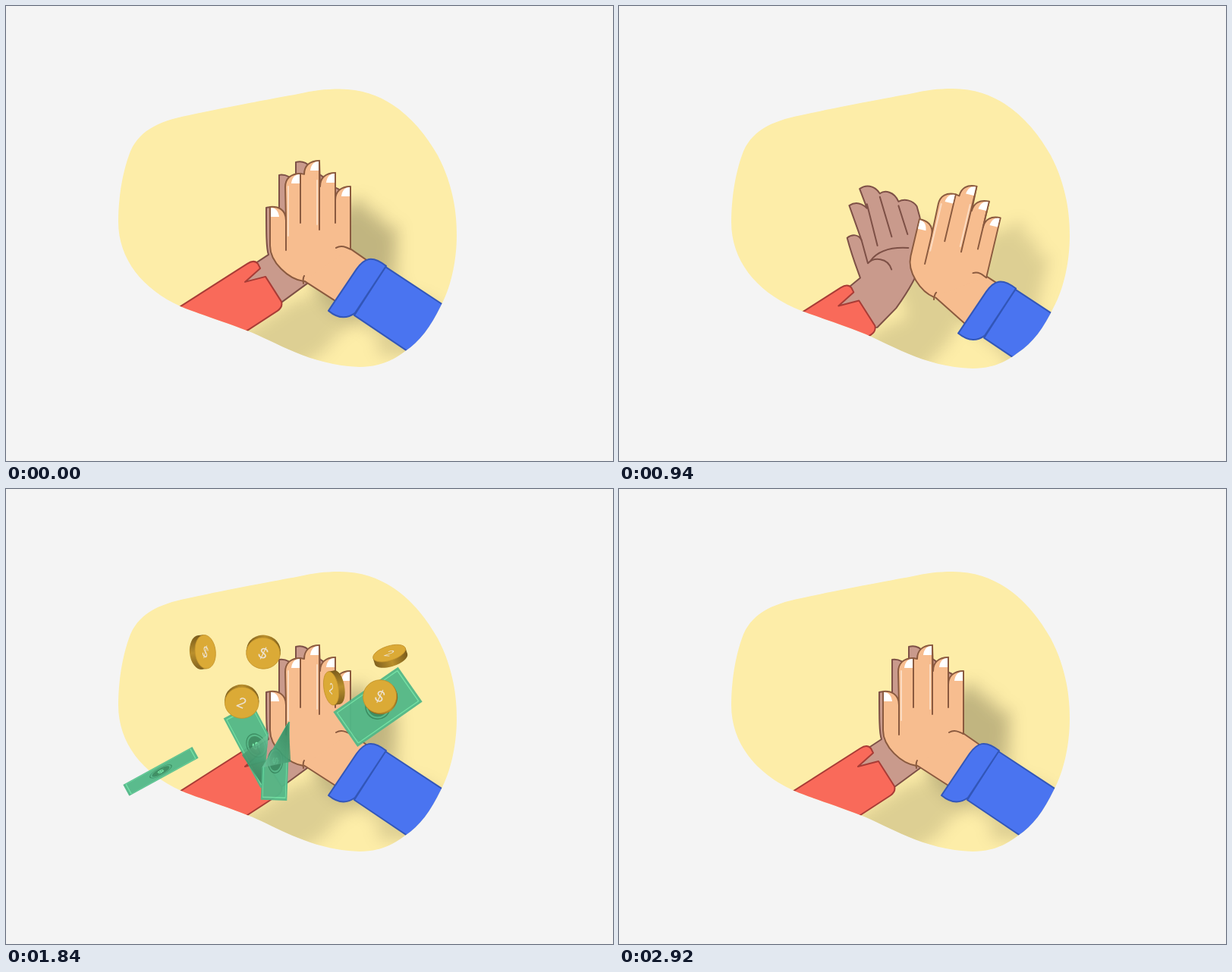
Animation of 800x600 px, one loop 2.94 s. Source, as an HTML page:

```html
<!DOCTYPE html>
<html lang="en">
<head>
<meta charset="utf-8">
<title>High five</title>
<style>
html, body { margin: 0; width: 100%; height: 100%; overflow: hidden; background: #f4f4f4; }
svg { display: block; width: 100%; height: 100%; }
text { font-family: Inter, "Liberation Sans", sans-serif; text-anchor: middle; dominant-baseline: central; }
path { stroke-linejoin: round; stroke-linecap: round; }
</style>
</head>
<body>
<svg viewBox="0 0 800 600">
  <defs>
    <clipPath id="clip"><path class="blob"/></clipPath>
    <filter id="cast" filterUnits="userSpaceOnUse" x="0" y="-50" width="800" height="800" color-interpolation-filters="sRGB">
      <feDropShadow dx="63" dy="50" stdDeviation="10" flood-color="#000" flood-opacity=".125"/>
    </filter>
    <linearGradient id="rim" x1="0" y1="0" x2="0" y2="1">
      <stop offset="0" stop-color="#7a5c1c"/><stop offset=".5" stop-color="#b98f2c"/><stop offset="1" stop-color="#80611f"/>
    </linearGradient>
    <linearGradient id="curl" x1="0" y1="0" x2="1" y2="1">
      <stop offset="0" stop-color="#6cc79c"/><stop offset=".5" stop-color="#3f9c71"/><stop offset="1" stop-color="#2c7d58"/>
    </linearGradient>
  </defs>
  <rect width="800" height="600" fill="#f4f4f4"/>
  <path class="blob" fill="#fdeda8"/>
  <g clip-path="url(#clip)">
    <g id="left" filter="url(#cast)"></g>
    <g id="right" filter="url(#cast)"></g>
  </g>
  <g id="money"></g>
</svg>
<script>
const LOOP = 2940, BURST = 980, APEX = 1160, LAND = 2200;
const HANDS = { x: 405, y: 215 };
const $ = id => document.getElementById(id);
const lerp = (a, b, p) => a + (b - a) * p;

function el(tag, attrs, parent) {
  const node = document.createElementNS('http://www.w3.org/2000/svg', tag);
  set(node, attrs);
  return parent.appendChild(node);
}
function set(node, attrs) {
  for (const key in attrs) node.setAttribute(key, attrs[key]);
}

// Smooth curve through (time, value) keys that never overshoots them.
function curve(t, ts, vs) {
  const last = ts.length - 1;
  if (t <= ts[0]) return vs[0];
  if (t >= ts[last]) return vs[last];
  const slope = i => (vs[i + 1] - vs[i]) / (ts[i + 1] - ts[i]);
  const tangent = i => {
    if (i === 0) return slope(0);
    if (i === last) return slope(last - 1);
    const a = slope(i - 1), b = slope(i);
    return a * b > 0 ? 2 * a * b / (a + b) : 0;
  };
  let i = 0;
  while (t > ts[i + 1]) i++;
  const h = ts[i + 1] - ts[i], u = (t - ts[i]) / h, w = 1 - u;
  return vs[i] * w * w * (1 + 2 * u) + vs[i + 1] * u * u * (3 - 2 * u)
    + h * u * w * (tangent(i) * w - tangent(i + 1) * u);
}

// Blends two paths that share the same commands.
const NUMBER = /-?[\d.]+/g;
function mix(a, b, p) {
  const goal = b.match(NUMBER);
  let i = 0;
  return a.replace(NUMBER, v => lerp(+v, +goal[i++], p).toFixed(2));
}

const blobs = document.querySelectorAll('.blob');
blobs.forEach(b => set(b, { d:
  'M440 109C505 109 545 155 569 197C590 237 594 275 594 303C594 340 585 375 573 397' +
  'C560 424 545 445 526 457C508 471 490 478 466 478C400 476 355 444 318 430' +
  'C285 417 255 408 231 398C180 375 148 335 148 285C148 255 153 222 162 197' +
  'C173 165 200 152 240 144C300 131 350 122 385 115.5C405 111 420 109 440 109Z' }));

const brown = '#7d5046', tan = '#8a5a3f';
const left = $('left'), right = $('right');
const line = stroke => ({ fill: 'none', stroke, 'stroke-width': 2 });
const skin = (fill, stroke) => ({ fill, stroke, 'stroke-width': 2 });

// Parts that change shape between the clapped and the open pose.
const parts = [];
function part(parent, style, closed, open) {
  parts.push({ node: el('path', style, parent), closed, open });
}

part(left, skin('#c99a8c', brown),
  'M308 355L346 330C343 322 343 300 343 268C350 266 358 268 360 280L360 225C366 224 374 226 382 235' +
  'L382 208C390 206 400 208 404 222C410 222 420 224 424 240C430 240 440 242 445 250' +
  'C448 280 440 310 425 330C415 345 405 362 397 368L363 393L320 388Z',
  'M255 424L285 392C278 372 264 362 251 350C257 341 266 340 272 342L237 308C245 299 254 298 262 304' +
  'L241 280C248 270 262 268 273 277C280 267 295 268 303 279C312 270 325 272 331 281' +
  'C345 303 362 325 365 350C366 375 348 400 328 434L314 460L270 470Z');
part(left, line(brown),
  'M382 225L382 300M404 230L404 290M424 250L424 290M370 330C380 320 400 320 420 325M360 280L362 320C370 315 385 315 390 330',
  'M262 304L292 335M273 277L307 321M303 279L329 314M286 343C298 323 314 315 336 312M272 342L288 362C295 350 318 350 323 368');
const redSleeve = el('path', { ...skin('#f96a5a', '#a83c36'),
  d: 'M80 494L318 342Q327 336 332 342L335 348L315 366L342 359L363 392Q365 399 358 404L180 520Z' }, left);

part(right, skin('#f7bd8f', tan),
  'M392 364L434 391L500 380L475 337L452 321', 'M444 406L480 450L540 440L530 402L511 391');

// The right hand: four fingers by one rule, and a mirrored thumb.
const palm = el('g', {}, right);
const fingers = [[388, 223, 65], [413, 206, 91], [434, 222, 66], [454, 240, 82]];
const thumb = { x: 348, y: 267 };
const tip = ([x, y]) => `L${x - 20} ${y + 18}C${x - 20} ${y + 7} ${x - 13} ${y} ${x} ${y}`;
const nail = (x, y, side) => `M${x - side} ${y + 1}v12h${-11 * side}c${side} -8 ${5 * side} -12 ${11 * side} -12z`;
el('path', { ...skin('#f7bd8f', tan),
  d: `M392 365C372 362 348 340 348 318V267C358 266 369 270 369 285${fingers.map(tip).join('')}V322` }, palm);
el('path', { ...line(tan),
  d: 'M369 285V324M435 321C442 317 448 320 454 323M392 368Q391 361 393 358' +
    fingers.slice(0, 3).map(([x, y, depth]) => `M${x} ${y}v${depth}`).join('') }, palm);
el('path', { ...line('#fff1e4'), opacity: .6, d: 'M372 240V305M410 232V290' }, palm);
el('path', { fill: '#fff',
  d: nail(thumb.x, thumb.y, -1) + fingers.map(([x, y]) => nail(x, y, 1)).join('') }, palm);

const blueSleeve = el('g', skin('#4a74f0', '#3256b8'), right);
el('path', { d: 'M500 346L720 491L640 532L459 410Z' }, blueSleeve);
el('path', { d: 'M425 404L462 349C472 335 482 330 501 345L460 407C449 415 437 414 425 404Z' }, blueSleeve);

// Money bursts out of the hands, then falls.
const money = $('money');
const LONG = 52, SHORT = 28;

// Each note flutters through four points [x, y, angle]; `flat` is when it lies flat, `sway` how far it rocks.
const bills = [
  { flat: .65, sway: .12, path: [[450, 172, 13], [482, 177, 79], [490, 287, 145], [495, 405, 210]] },
  { flat: 0, sway: .35, path: [[288, 169, 17], [210, 180, 25], [204, 372, 151], [180, 480, 212]] },
  { flat: .4, sway: .35, path: [[390, 188, -35], [346, 196, 40], [330, 338, 62], [327, 450, 122]] },
  { flat: 1, sway: .35, path: [[430, 192, 118], [400, 220, 192], [355, 358, 272], [357, 534, 315]] }
];
for (const b of bills) {
  const [x, y, angle] = b.path[3];
  b.path.push([x + 20, y + 275, angle + 60]);
  b.node = el('g', { opacity: .95 }, money);
  b.sheet = el('path', { fill: '#52b888' }, b.node);
  b.frame = el('path', { fill: 'none', stroke: '#6fe3a6', 'stroke-width': 1.5, transform: 'scale(.93 .87)' }, b.node);
  el('circle', { r: 16, fill: 'none', stroke: '#338a60', 'stroke-width': 1.5 }, b.node);
  el('circle', { r: 13, fill: '#378c62' }, b.node);
  el('text', { 'font-size': 16, 'font-weight': 700, fill: '#74eeae' }, b.node).textContent = '$';
  b.flap = el('path', { fill: 'url(#curl)', opacity: .85 }, b.node);
}

// Each coin goes from one point to another; `lean` is how far its face turns while it wobbles.
const coins = [
  { from: [293, 92], to: [207, 470], lean: 53, tilt: [20, -20], glyph: '$' },
  { from: [377, 95], to: [281, 463], lean: -23, tilt: [100, 95], glyph: '$' },
  { from: [465, 87], to: [570, 497], lean: 65, tilt: [96, 60], glyph: '2' },
  { from: [418, 131], to: [455, 534], lean: -65, tilt: [15, -22], glyph: '2' },
  { from: [321, 158], to: [295, 533], lean: -23, tilt: [85, 95], glyph: '2' },
  { from: [476, 153], to: [520, 526], lean: -14, tilt: [40, 60], glyph: '$' }
];
for (const c of coins) {
  c.node = el('g', {}, money);
  c.back = el('ellipse', { ry: 22.5, fill: 'url(#rim)' }, c.node);
  c.side = el('rect', { y: -22.5, height: 45, fill: 'url(#rim)' }, c.node);
  c.face = el('ellipse', { ry: 22.3, fill: '#dbaa36', stroke: '#c2922a', 'stroke-width': .8 }, c.node);
  c.sign = el('text', { 'font-size': 20, fill: '#ece2d2' }, c.node);
  c.sign.textContent = c.glyph;
}

function drawHands(t) {
  const open = curve(t, [0, 80, 400, 740, 830, 1000], [0, 0, .82, 1, 1.08, 0]);
  const lift = curve(t, [0, 140, 380], [2, 18, 0]);
  for (const p of parts) set(p.node, { d: mix(p.closed, p.open, open) });
  set(palm, { transform: `translate(${392 + 52 * open} ${364 + 42 * open}) rotate(${29 * open}) scale(${1 - .05 * open}) translate(-392 -364)` });
  set(redSleeve, { transform: `translate(${-56 * open} ${64 * open})` });
  set(blueSleeve, { transform: `translate(${48 * open} ${60 * open})` });
  for (const arm of [left, right]) set(arm, { transform: `translate(0 ${-lift})` });
  const squash = 1 - .0068 * Math.max(0, 1 - t / 60);
  blobs.forEach(b => set(b, { transform: `translate(0 ${183 * (1 - squash)}) scale(1 ${squash})` }));
}

function drawBill(b, t, q) {
  const burst = curve(t, [BURST, 1080, APEX], [0, .9, 1]);
  const [x, y, angle] = [0, 1, 2].map(k =>
    curve(t, [APEX, 1480, 1840, LAND, LOOP], b.path.map(p => p[k])));
  const phase = 2 * Math.PI * (q - b.flat) / 1.3;
  const rock = 1 - b.sway + b.sway * Math.cos(phase);
  const curl = 1.7 * b.sway * Math.abs(Math.sin(phase));
  // The corner beyond the crease is mirrored across it.
  const run = 2 * LONG * curl, drop = 2 * SHORT * Math.min(1, curl * 1.6);
  const fold = 2 * run * drop / (run * run + drop * drop || 1);
  const crease = `M${LONG - run} ${-SHORT}L${LONG} ${drop - SHORT}`;
  const sheet = `${crease}V${SHORT}H${-LONG}V${-SHORT}Z`;
  set(b.sheet, { d: sheet });
  set(b.frame, { d: sheet });
  set(b.flap, { d: `${crease}L${LONG - fold * drop} ${fold * run - SHORT}Z` });
  set(b.node, { transform: `translate(${lerp(HANDS.x, x, burst)} ${lerp(HANDS.y, y, burst)}) rotate(${angle}) scale(${burst} ${burst * rock})` });
}

function drawCoin(c, t, q) {
  const burst = curve(t, [BURST, 1080, APEX], [0, 1.03, 1]);
  const x = lerp(HANDS.x, lerp(c.from[0], c.to[0], q ** 2.2), burst);
  const y = lerp(HANDS.y, lerp(c.from[1], c.to[1], q ** 2.65), burst);
  const tilt = lerp(c.tilt[0], c.tilt[1], q);
  const turn = c.lean * Math.PI / 180 * Math.cos(3 * Math.PI * q);
  const width = Math.cos(turn), rim = 9 * Math.sin(turn);
  // The rim trails behind the face, on the side it has turned away from.
  const shift = -rim / 2 * Math.sign(c.tilt[0] < 50 ? 1 : -1);
  set(c.node, { transform: `translate(${x} ${y}) rotate(${tilt})` });
  set(c.back, { cx: shift, rx: 22.3 * width });
  set(c.side, { x: -Math.abs(shift), width: 2 * Math.abs(shift) });
  set(c.face, { cx: -shift, rx: 22.3 * width });
  set(c.sign, { transform: `translate(${-shift} 0) scale(${width} 1) rotate(${25 - tilt})` });
}

function draw(t) {
  drawHands(t);
  const flying = t > BURST;
  money.style.display = flying ? '' : 'none';
  if (!flying) return;
  const q = Math.max(0, (t - APEX) / (LAND - APEX));
  for (const b of bills) drawBill(b, t, q);
  for (const c of coins) drawCoin(c, t, q);
}

const start = performance.now();
function tick() {
  draw((performance.now() - start) % LOOP);
  requestAnimationFrame(tick);
}
tick();
</script>
</body>
</html>
```
